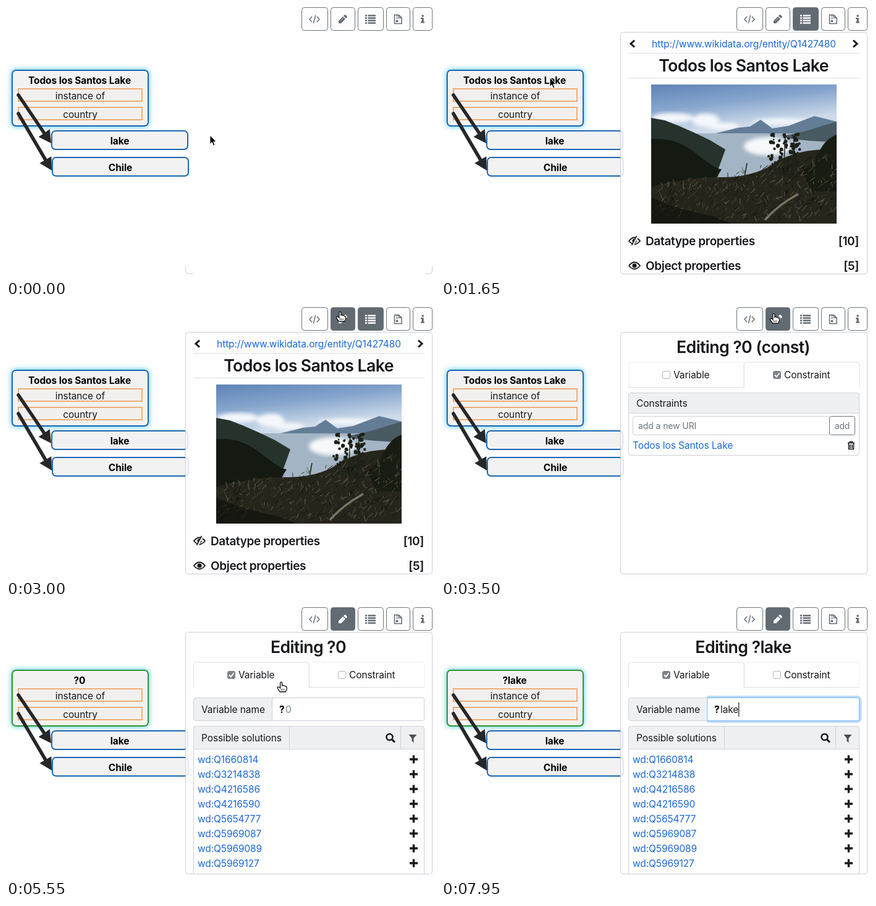
Write an HTML page that moves like this. It is 694 px wide and 440 px high and loops after 8000 ms.

```html
<!DOCTYPE html>
<html lang="en">
<head>
<meta charset="utf-8">
<title>Query builder</title>
<style>
html, body { margin: 0; width: 100%; height: 100%; overflow: hidden; background: #fefefe; }
svg { display: block; width: 100vw; height: 100vh; }
text { font: 15.5px Inter, "Open Sans", sans-serif; letter-spacing: -.1px; fill: #16181b; }
.mid { text-anchor: middle; }
.end { text-anchor: end; }
.bold { font-weight: 700; fill: #000; }
.title { font-size: 26.7px; font-weight: 600; letter-spacing: -.6px; text-anchor: middle; }
.section { font-size: 19px; font-weight: 600; letter-spacing: -.35px; }
.small { font-size: 14px; fill: #6c757d; }
.link { fill: #1c69d4; }
.muted { fill: #7c848b; }
.box, .panel { fill: #fefefe; stroke: #cdd0d8; }
.panel { fill-opacity: .85; }
.head { fill: #eef0f2; stroke: #d0d3d8; }
.rule { fill: none; stroke: #dcdfe4; }
.faint { fill: none; stroke: #eff1f4; }
.node { fill: #f2f2f2; stroke: #1c66b4; stroke-width: 2; }
.prop { fill: #f2f0ee; stroke: #edae74; stroke-width: 2; }
.arrow { stroke: #262729; fill: #262729; }
.ink { fill: none; stroke: #16181b; }
.solid { fill: #16181b; }
</style>
</head>
<body>
<svg id="stage" viewBox="0 0 694 440" preserveAspectRatio="none"></svg>
<script>
const LOOP = 8000;
const OPEN = 1200, PHOTO = 1450, EDIT = 3300, VARIABLE = 4700, SOLVED = 5200, FOCUS = 6400;
const KEY_TIMES = [7000, 7200, 7400, 7600], WORD = 'lake';

const text = (x, y, s, cls = '', id = '') => `<text x="${x}" y="${y}" class="${cls}" id="${id}">${s}</text>`;
const rect = (x, y, w, h, cls, r = 0, extra = '') =>
  `<rect x="${x}" y="${y}" width="${w}" height="${h}" rx="${r}" class="${cls}" ${extra}/>`;
const path = (d, cls = '', extra = '') => `<path d="${d}" class="${cls}" ${extra}/>`;
const group = (id, ...parts) => `<g id="${id}">${parts.join('')}</g>`;

function arrow(x1, y1, x2, y2) {
  const len = Math.hypot(x2 - x1, y2 - y1), ux = (x2 - x1) / len, uy = (y2 - y1) / len;
  const bx = x2 - 20 * ux, by = y2 - 20 * uy;
  return path(`M${x1} ${y1}L${bx} ${by}`, 'arrow', 'stroke-width="5.5" stroke-linecap="round"') +
    path(`M${x2} ${y2}L${bx - 11 * uy} ${by + 11 * ux}L${bx + 11 * uy} ${by - 11 * ux}Z`, 'arrow', 'style="stroke:none"');
}

// Toolbar: left edge, width and an icon drawn in currentColor
const line = 'fill="none" stroke="currentColor"';
const listRows = [15.5, 19.5, 23.5, 27.5].map(y => `M581 ${y}h3M585.5 ${y}h12.5`).join('');
const BUTTONS = {
  code: [478.5, 42, path('M495 17l-4 4.5 4 4.5M503 17l4 4.5-4 4.5M500.7 15l-3.4 13', '', line + ' stroke-width="1.4"')],
  edit: [525.5, 39, path('M538 28v-4l7-7 4 4-7 7zM546 16l1.5-1.5q1-.8 2 0l2 2q.8 1 0 2L550 20z', '', 'fill="currentColor"') +
    path('M540.5 24.5l5.5-5.5', '', 'fill="none" stroke="#ddd" stroke-width=".7"')],
  list: [569.5, 41, path(listRows, '', line + ' stroke-width="2.6"')],
  file: [615.5, 38, path('M628.5 14.5h7l4.500 4.500v9.500h-11.500zM635.5 14.5v4.500h4.500', '', line + ' stroke-width="1.5"') +
    path('M632.5 15v7', '', line + ' stroke-width="2" stroke-dasharray="1.3 1"') + '<circle cx="632.5" cy="24.3" r="1.9" fill="currentColor"/>'],
  info: [658.5, 31, path('M672.5 14.5h3.200v3h-3.200zM671 19h4.700v6.500h1.300v2h-6v-2h1.500v-4.500H671z', '', 'fill="currentColor"')],
};
const button = ([id, [x, w, icon]]) => group(id, rect(x, 2.5, w, 37, '', 4, 'stroke="#6c757d"'), icon);

function photo() {
  let seed = 7;
  const rnd = () => (seed = seed * 16807 % 2147483647) / 2147483647;
  let grass = '', leaves = '';
  for (let i = 0; i < 420; i++) {
    const x = 342 + rnd() * 296, top = 292 - (x - 340) * .17;
    const y = top + rnd() * (350 - top);
    grass += path(`M${x.toFixed(1)} ${y.toFixed(1)}l${(rnd() * 14 - 4).toFixed(1)} ${(-2 - rnd() * 7).toFixed(1)}`, '',
      `stroke="${['#4f493a', '#0e100c', '#6b6250', '#333a22'][i % 4]}"`);
  }
  for (let i = 0; i < 110; i++) {
    const x = 530 + rnd() * 52, y = 206 + rnd() * 68;
    leaves += `<circle cx="${x.toFixed(1)}" cy="${y.toFixed(1)}" r="${(1 + rnd() * 2.4).toFixed(1)}"/>`;
  }
  return `<g clip-path="url(#photoClip)">
    ${rect(340, 127, 300, 225, '', 0, 'fill="url(#sky)"')}
    <g fill="#f4f7fb" filter="url(#soft)"><ellipse cx="428" cy="185" rx="22" ry="11"/><ellipse cx="375" cy="181" rx="34" ry="8"/>
      <ellipse cx="458" cy="195" rx="25" ry="6"/><ellipse cx="550" cy="187" rx="45" ry="5"/></g>
    ${path('M440 207L480 197 500 195 517 184 536 198 562 194 604 178 640 187V215H440z', '', 'fill="#647d97"')}
    ${rect(340, 206, 300, 80, '', 0, 'fill="#a3b4c4"')}
    <ellipse cx="528" cy="227" rx="38" ry="15" fill="#f6f8fa" filter="url(#soft)"/>
    ${path('M555 210Q590 203 610 196L640 187V220Q600 220 555 213z', '', 'fill="#4a5a62"')}
    ${path('M340 181L362 185 385 194 410 205 435 217 460 232 450 260 430 300H340z', '', 'fill="#26332c"')}
    ${path('M340 215Q380 212 412 238T454 264L430 305H340z', '', 'fill="#141a12"')}
    ${path('M340 293Q400 276 452 277T540 254 640 232V352H340z', '', 'fill="#26251c"')}
    ${path('M640 208Q622 215 612 235T584 268L600 300H640z', '', 'fill="#181c12"')}
    <g fill="#1d2218">${leaves}${path('M554 280L557 206M568 278L571 214M490 282l5-28', '', 'stroke="#1d2218" stroke-width="1.5"')}</g>
    ${grass}
    ${path('M524 346Q545 322 578 304', '', 'fill="none" stroke="#7a7363" stroke-width="3.5"')}
    ${path('M340 352V310Q385 330 440 340L470 352z', '', 'fill="#10120c" opacity=".7"')}
  </g>`;
}

const eye = (y, hidden) => path(`M304 ${y}Q313 ${y - 11} 322 ${y}Q313 ${y + 11} 304 ${y}z`, 'ink', 'stroke-width="1.8"') +
  `<circle cx="313" cy="${y}" r="3.6" class="solid"/>` +
  (hidden ? path(`M309 ${y + 8}L318 ${y - 8}`, 'ink', 'stroke-width="3.6" style="stroke:#fefefe"') +
    path(`M308.5 ${y + 7}L316.5 ${y - 8}`, 'ink', 'stroke-width="1.6"') : '');

const checkbox = (x, on) => rect(x + .5, 105.5, 12, 12, '', 2.5, on ? 'fill="#7d838a" stroke="#7d838a"' : 'fill="#fff" stroke="#b0b3b8"') +
  (on ? path(`M${x + 3} 111.5l2.800 3 4.700-6`, '', 'fill="none" stroke="#fff" stroke-width="2"') : '');

const tabs = variable => {
  const tab = x => `M${x} 131.500V95q0-4 4-4h179q4 0 4 4v36.500`;
  return path(tab(variable ? 490 : 303.5), 'faint') + path(tab(variable ? 303.5 : 490), 'rule') +
    path(variable ? 'M490 131.500H677' : 'M303 131.500H490', 'rule') +
    checkbox(358, variable) + text(376, 117, 'Variable') + checkbox(537, !variable) + text(555, 117, 'Constraint');
};

const plus = y => path(`M653 ${y}h13M659.5 ${y - 6.5}v13`, 'ink', 'stroke-width="3.4"');
const ids = [1660814, 3214838, 4216586, 4216590, 5654777, 5969087, 5969089, 5969127];

stage.innerHTML = `<defs>
  <clipPath id="photoClip">${rect(340, 127, 300, 225, '')}</clipPath>
  <clipPath id="panelClip">${rect(290, 42, 400, 391, '')}</clipPath>
  <linearGradient id="sky" x1="0" y1="0" x2=".15" y2="1"><stop stop-color="#5f83b6"/><stop offset=".18" stop-color="#86a5cd"/><stop offset=".36" stop-color="#cddbea"/></linearGradient>
  <filter id="soft"><feGaussianBlur stdDeviation="3"/></filter></defs>` +
  rect(10, 104, 220, 90, 'node', 6, 'id="subject" style="filter:drop-shadow(0 0 4px #3cc8f0)"') +
  text(119, 126, '', 'mid bold', 'subjectName') +
  rect(20, 134, 200, 20, 'prop') + text(120, 151, 'instance of', 'mid') +
  rect(20, 164, 200, 20, 'prop') + text(120, 181, 'country', 'mid') +
  rect(74, 202, 220, 30, 'node', 6) + text(184, 224, 'lake', 'mid bold') +
  rect(75, 245, 220, 30, 'node', 6) + text(185, 267, 'Chile', 'mid bold') +
  arrow(20, 144, 73, 222) + arrow(20, 174, 74, 266) +
  Object.entries(BUTTONS).map(button).join('') +
  group('corners', path('M290.5 421v8q0 4 4 4h8M689.5 421v8q0 4-4 4h-8', 'rule', 'style="stroke:#cdd0d8"')) +
  rect(290.5, 42.5, 399, 391, 'panel', 4, 'id="panel"') +
  group('details',
    path('M313 55.5l-6 5.500 6 5.500M667 55.5l6 5.500-6 5.500', 'ink', 'stroke-width="3"'),
    text(490, 67, 'http://www.wikidata.org/entity/Q1427480', 'link mid'),
    path('M303 76.500H677', 'rule'), text(489.5, 106, 'Todos los Santos Lake', 'title')) +
  group('media',
    path('M303 116.500H677', 'rule'), photo(),
    eye(380, true), text(331, 387, 'Datatype properties', 'section'), text(676, 387, '[10]', 'section end'),
    eye(420, false), text(331, 427, 'Object properties', 'section'), text(676, 427, '[5]', 'section end')) +
  group('constraint',
    text(489, 76, 'Editing ?0 (const)', 'title'), tabs(false),
    rect(303.5, 140.5, 373, 101, 'box', 4), path('M303.5 173.500V144.500q0-4 4-4h365q4 0 4 4v29z', 'head'),
    text(316, 163, 'Constraints'),
    rect(310.5, 178.5, 318, 30, 'box', 3), text(319, 199, 'add a new URI', 'small'),
    rect(628.5, 178.5, 41, 30, 'box', 3, 'style="stroke:#6c757d"'), text(649, 199, 'add', 'small mid'),
    text(310, 231, 'Todos los Santos Lake', 'link'),
    path('M658 221.5h11M661.5 221v-1.500h4v1.500M659.5 222v9.500h8V222M662 224v6M665 224v6', 'ink', 'stroke-width="1.6"')) +
  group('variable',
    text(489, 76, '', 'title', 'varTitle'), tabs(true),
    rect(429, 147, 249.5, 40, '', 5, 'id="ring" fill="none" stroke="#b5d7fb" stroke-width="3.5"'),
    rect(303.5, 148.5, 373, 37, 'box', 4), path('M430.5 148.500H307.500q-4 0-4 4v29q0 4 4 4h123z', 'head'),
    rect(430.5, 148.5, 246, 37, 'box', 3, 'id="field"'),
    text(316, 173, 'Variable name'), text(442, 173, '?', 'bold'), text(452, 173, '', '', 'typed'),
    path('M0 156v23', 'ink', 'id="caret" stroke-width="1.2"'),
    `<g clip-path="url(#panelClip)">`, rect(303.5, 194.5, 373, 260, 'box', 4),
    path('M303.5 231.500V198.500q0-4 4-4h365q4 0 4 4v33z', 'head'), path('M458.5 195v36M638.5 195v36', 'rule', 'style="stroke:#d0d3d8"'),
    text(316, 219, 'Possible solutions'),
    '<circle cx="620.5" cy="212" r="5" class="ink" stroke-width="2.5"/>', path('M624 215.5l5 5', 'ink', 'stroke-width="3"'),
    path('M651.5 208h13l-5 6v7l-3-2.500v-4.500z', 'solid', 'style="fill:#495057"'),
    group('solutions', ...ids.map((n, i) => text(310, 254 + 24 * i, 'wd:Q' + n, 'link') + plus(248 + 24 * i))), '</g>') +
  group('pointer', path('M0 0V14.500L3.300 11.500 5.600 17 8 16 5.700 10.700H10.200z', '', 'fill="#000" stroke="#fff"')) +
  group('hand', path('M-1.5 1.5Q0-1 1.5 1.5V6Q3 4.5 4.300 6.500 6 5.500 7 7.500 9 7 9 9.500V12L7 16H-2L-6 10Q-6 7-3.500 8.500L-1.500 10z', '', 'fill="#fff" stroke="#111" stroke-width="1.3"') +
    path('M2 11v3M4.5 11v3M0 11v3', '', 'stroke="#111" stroke-width=".8"')) +
  group('beam', path('M-3-7.500Q0-7.500 0-5.500V5.500Q0 7.500-3 7.500M3-7.500Q0-7.500 0-5.500M0 5.500Q0 7.500 3 7.500M-1.500 2h3', '', 'fill="none" stroke="#111" stroke-width="1.2"'));

const $ = id => document.getElementById(id);
const show = (id, on) => { $(id).style.display = on ? '' : 'none'; };
const clamp = v => Math.min(1, Math.max(0, v));
const ramp = (t, start) => clamp((t - start) / 150);

// Mouse stops: time, x, y
const STOPS = [[0, 330, 209], [300, 330, 209], [1050, 158, 111], [1300, 158, 111], [1650, 176, 116], [2000, 176, 116],
  [2900, 540.5, 9], [3400, 540.5, 9], [4400, 465, 113], [4650, 440, 113], [5300, 440, 113], [6300, 473, 175], [LOOP, 473, 175]];

function mouseAt(t) {
  const i = STOPS.findIndex(s => s[0] > t);
  const [a, b] = [STOPS[i - 1], STOPS[i]];
  const p = (t - a[0]) / (b[0] - a[0]), e = p * p * (3 - 2 * p);
  return [a[1] + (b[1] - a[1]) * e, a[2] + (b[2] - a[2]) * e];
}

function setButton(id, amount) {
  const mix = (from, to) => `rgb(${from.map((c, k) => Math.round(c + (to[k] - c) * amount))})`;
  $(id).style.color = mix([98, 106, 113], [255, 255, 255]);
  $(id).firstChild.style.fill = mix([254, 254, 254], [98, 106, 114]);
}

function drawMouse(t) {
  const [x, y] = mouseAt(t);
  const onButton = y < 40 && x > 478, onTab = t > EDIT && y > 91 && y < 131;
  const onField = t > VARIABLE && y > 148;
  const shape = onField ? 'beam' : onButton || onTab ? 'hand' : 'pointer';
  for (const id of ['pointer', 'hand', 'beam']) {
    show(id, id === shape && t < KEY_TIMES[0]);
    $(id).setAttribute('transform', `translate(${x} ${y})`);
  }
}

function draw(t) {
  const isVariable = t >= VARIABLE, typed = WORD.slice(0, KEY_TIMES.filter(k => t >= k).length);
  const name = '?' + (typed || '0');

  $('subjectName').textContent = isVariable ? name : 'Todos los Santos Lake';
  $('subject').style.stroke = isVariable ? '#2f9630' : '#1c66b4';

  show('corners', t < OPEN);
  show('panel', t >= OPEN);
  $('panel').setAttribute('height', t < PHOTO ? 74 : 391);
  show('details', t >= OPEN && t < EDIT);
  show('media', t >= PHOTO && t < EDIT);
  show('constraint', t >= EDIT && !isVariable);
  show('variable', isVariable);
  show('solutions', t >= SOLVED);

  setButton('list', ramp(t, OPEN - 20) - ramp(t, EDIT));
  setButton('edit', ramp(t, 2780));
  for (const id of ['code', 'file', 'info']) setButton(id, 0);

  $('varTitle').textContent = 'Editing ' + name;
  $('typed').textContent = typed || '0';
  $('typed').setAttribute('class', typed ? '' : 'muted');
  const focus = ramp(t, FOCUS);
  $('ring').style.opacity = focus;
  $('field').style.stroke = focus > .2 ? '#80bdff' : '';
  const caretX = typed ? 452.5 + $('typed').getComputedTextLength() : 451.5;
  $('caret').setAttribute('transform', `translate(${caretX} 0)`);
  show('caret', t >= KEY_TIMES[0] || t >= FOCUS && (t - FOCUS) % 1000 < 500);

  drawMouse(t);
}

const start = performance.now();
function tick() {
  draw((performance.now() - start) % LOOP);
  requestAnimationFrame(tick);
}
tick();
</script>
</body>
</html>
```
